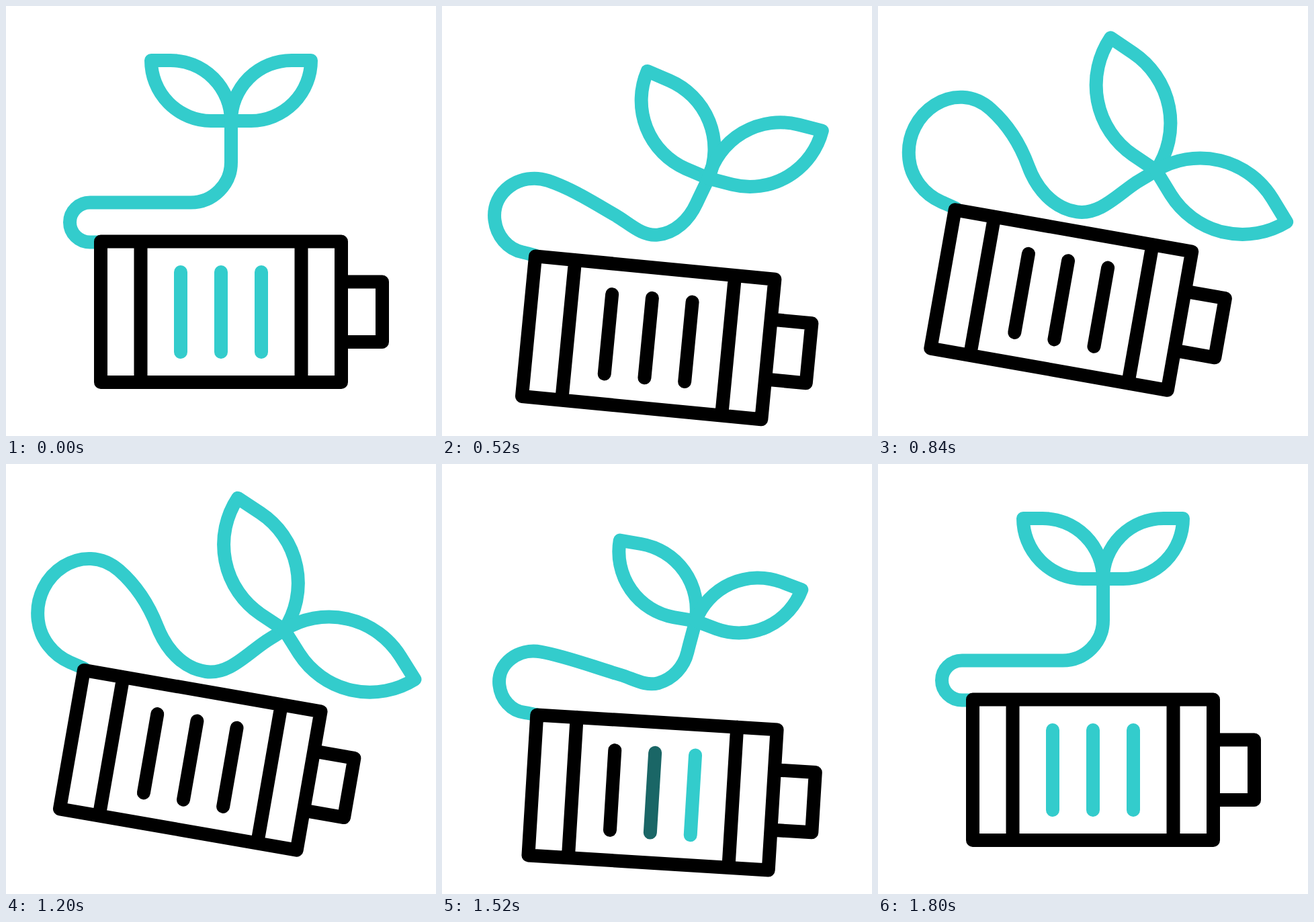
These frames come from a looping animation (640 px wide and 640 px high, 2000 ms). An HTML page:

```html
<!DOCTYPE html>
<html lang="en">
<head>
<meta charset="utf-8">
<title>Plant battery</title>
<style>
  html, body { margin: 0; width: 100%; height: 100%; overflow: hidden; background: #fff; }
  svg { display: block; width: 100vw; height: 100vh; }
  path { fill: none; stroke-width: 20; stroke-linecap: round; stroke-linejoin: round; }
  .plant { stroke: #33cccc; }
  .case { stroke: #000; }
</style>
</head>
<body>
<svg viewBox="0 0 640 640">
  <g id="all">
    <g class="plant">
      <path id="stalk"/>
      <path id="left" d="M0 0H-30A90 90 0 0 1 -119 -90H-90A90 90 0 0 1 0 0Z"/>
      <path id="right" d="M0 0H-30A90 90 0 0 1 -119 -90H-90A90 90 0 0 1 0 0Z"/>
    </g>
    <path class="case" d="M141 350.5H499V560H141ZM200.5 350.5V560M439.5 350.5V560M499 410.5H560V500H499"/>
    <path class="bar" d="M260 396V515"/>
    <path class="bar" d="M320 396V515"/>
    <path class="bar" d="M380 396V515"/>
  </g>
</svg>
<script>
const LOOP = 2000, STEP = 40;
const $ = id => document.getElementById(id);
const bars = [...document.querySelectorAll('.bar')];

// Key points of the stalk, at rest and bent: x, y, heading in degrees.
// Without a heading, the point lies on the arc through its neighbours.
const REST = [
  [141, 351.5, 180], [125, 351.5, 180], [95, 322], [125, 292.5, 0],
  [275, 292.5, 0], [317.4, 274.9], [335, 232.4, -90], [335, 171, -90]
];
const BENT = [
  [142, 348.5, 200], [119, 342.5, 194], [60.6, 288], [167.6, 194, 32],
  [237, 267.5, 60], [320.2, 322], [400.4, 263, -43], [425.5, 241, -43]
];

const ramp = (t, a, b) => Math.min(1, Math.max(0, (t - a) / (b - a)));
const ease = (t, a, b) => { const k = ramp(t, a, b); return k * k * (3 - 2 * k); };
const swing = (t, a, b, c, d) => ease(t, a, b) - ease(t, c, d);
const mix = (a, b, k) => a + (b - a) * k;
const bezier = (a, b, c, k) => 3 * k * (1 - k) ** 2 * a + 3 * k * k * (1 - k) * b + k ** 3 * c;
const direction = (a, b) => Math.atan2(b.y - a.y, b.x - a.x);

function bend(p) {
  const move = p * (1.06 - 0.06 * p), turn = p ** 1.5;
  const pts = REST.map(([x, y, h], i) => {
    const [bx, by, bh] = BENT[i];
    return { x: mix(x, bx, move), y: mix(y, by, move), h: mix(h, bh, turn) * Math.PI / 180 };
  });
  pts.forEach((q, i) => {
    if (!isNaN(q.h)) return;
    const a = pts[i - 1], b = pts[i + 1];
    q.h = direction(a, q) + direction(q, b) - direction(a, b);
  });
  return pts;
}

// Joins two points by a cubic that is a circular arc when the headings allow it
function join(a, b) {
  const d = b.h - a.h;
  const angle = Math.atan2(Math.sin(d), Math.cos(d));
  const r = Math.hypot(b.x - a.x, b.y - a.y) / (3 * Math.cos(angle / 4) ** 2);
  return 'C' + [
    a.x + r * Math.cos(a.h), a.y + r * Math.sin(a.h),
    b.x - r * Math.cos(b.h), b.y - r * Math.sin(b.h), b.x, b.y
  ].map(n => n.toFixed(2)).join(' ');
}

function setLeaf(el, { x, y }, angle, size, side) {
  el.setAttribute('transform',
    `translate(${x} ${y}) rotate(${angle}) scale(${side * size} ${size})`);
  el.style.strokeWidth = 20 / size;
}

function draw(t) {
  const p = swing(t, 200, 800, 1160, 1760);
  const dx = bezier(-6.1, -7.2, -47.3, p), dy = bezier(40.5, 68.5, -17.7, p);
  $('all').setAttribute('transform', `translate(${dx} ${dy}) rotate(${10 * p} 320 455.5)`);

  const pts = bend(p), top = pts[pts.length - 1];
  $('stalk').setAttribute('d', `M${pts[0].x} ${pts[0].y}` +
    pts.slice(1).map((q, i) => join(pts[i], q)).join(''));

  const size = 1 + 0.4 * swing(t, 200, 780, 1160, 1700);
  setLeaf($('left'), top, 24 * swing(t, 200, 680, 1160, 1700), size, 1);
  setLeaf($('right'), top, 48.6 * swing(t, 400, 840, 1160, 1760), size, -1);

  // All bars go out together, then light up from right to left
  bars.forEach((bar, i) => {
    const on = 1320 + 120 * (2 - i);
    const k = 1 - ramp(t, 40, 120) + ramp(t, on, on + 160);
    bar.style.stroke = `rgb(${[51, 204, 204].map(c => Math.round(c * k))})`;
  });
}

const start = performance.now();
function tick() {
  const t = (performance.now() - start) % LOOP;
  draw(Math.floor(t / STEP) * STEP);
  requestAnimationFrame(tick);
}
tick();
</script>
</body>
</html>
```
